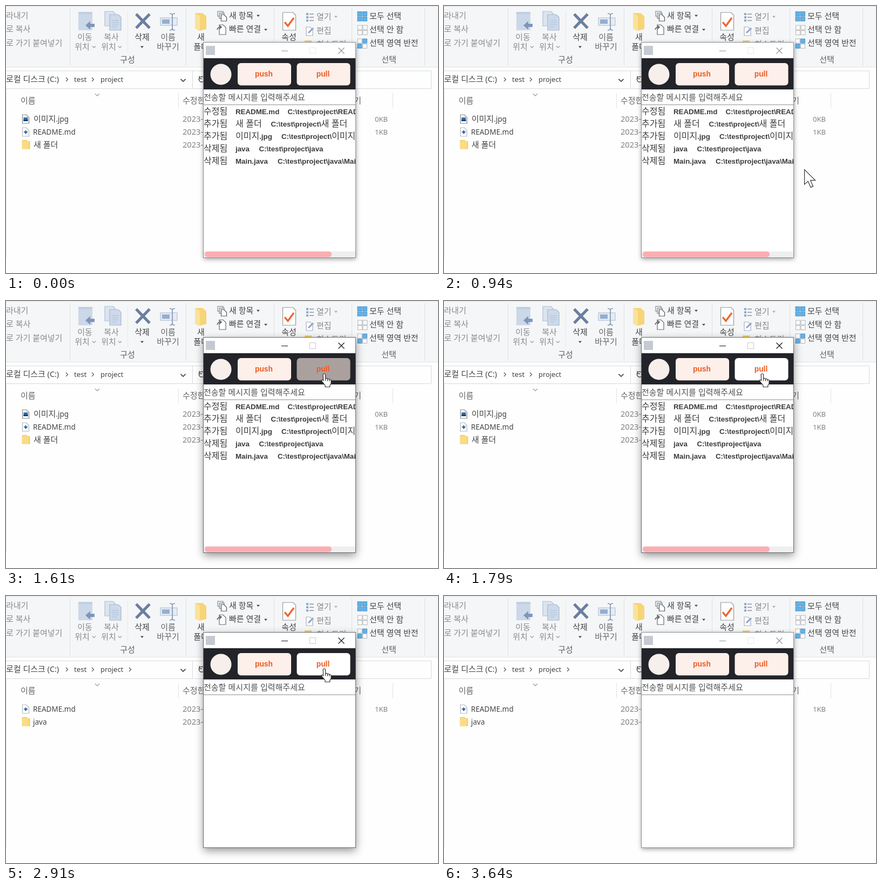
An HTML page that plays this animation: 800 by 496 pixels, repeating every 3670 ms.

```html
<!DOCTYPE html>
<html lang="ko">
<head>
<meta charset="utf-8">
<style>
html, body { margin: 0; width: 100%; height: 100%; overflow: hidden; background: #fefefe; }
svg { display: block; width: 800px; height: 496px; }
text { font-family: "Noto Sans", "Noto Sans CJK KR", sans-serif; white-space: pre; }
.swing text { font-family: "Liberation Sans", "Noto Sans CJK KR", sans-serif; }
</style>
</head>
<body>
<svg id="stage" viewBox="0 0 800 496" xmlns="http://www.w3.org/2000/svg"></svg>
<script>
const LOOP = 3670;
const INK = '#434448', DIM = '#8a8b8f';

const rect = (x, y, w, h, fill, more = '') =>
  `<rect x="${x}" y="${y}" width="${w}" height="${h}" fill="${fill}" ${more}/>`;
const path = (d, stroke, w = 1, fill = 'none', more = '') =>
  `<path d="${d}" stroke="${stroke}" stroke-width="${w}" fill="${fill}" ${more}/>`;
const vline = (x, y1, y2, c) => rect(x, y1, 1, y2 - y1, c);

// Hangul and Latin runs get their own font size; y is the middle of the line.
function label(x, y, str, { fill = INK, ko = 15, en = 13.5, anchor = 'start', weight = 400, koWeight = weight } = {}) {
  const runs = str.split(/([가-힣]+(?: [가-힣]+)*)/).filter(Boolean).map(s => {
    const han = /[가-힣]/.test(s);
    return `<tspan font-size="${han ? ko : en}" font-weight="${han ? koWeight : weight}">${s}</tspan>`;
  }).join('');
  return `<text x="${x}" y="${y + 5}" fill="${fill}" text-anchor="${anchor}">${runs}</text>`;
}
const mid = (x, y, s, fill) => label(x, y, s, { fill, anchor: 'middle' });
const tri = (x, y, c) => `<path d="M${x - 3} ${y - 1.5}h6l-3 3.5z" fill="${c}"/>`;
const down = (x, y, s, c, w = 1.2) => path(`M${x - s} ${y - s / 2}l${s} ${s}l${s} ${-s}`, c, w);
const next = x => path(`M${x - 2} 133l3.5 3.5l-3.5 3.5`, '#555', 1.2);
const page = (x, y, w, h, stroke, fill = '#fff') =>
  path(`M${x} ${y}h${w - 5}l5 5v${h - 5}h${-w}z`, stroke, 1.2, fill);

function tiles(x, y, fills) {
  return fills.map((f, i) => rect(x + (i % 2) * 9.5, y + (i >> 1) * 9.5, 8, 8, f ? '#62b1e6' : '#fafafa',
    `stroke="${f ? '#3a8cc9' : '#a5a7ab'}" stroke-width=".8"`)).join('');
}

const arrowLeft = (x, y, c) => `<path d="M${x} ${y}l9-8v5h8v6h-8v5z" fill="${c}"/>`;

function ribbon() {
  const seps = [118, 333, 496, 640, 775].map(x => vline(x, 4, 111, '#dfe0e2')).join('');
  return rect(0, 0, 800, 113, '#f5f6f7') + rect(0, 0, 800, 1, '#e3e4e6') + rect(0, 113, 800, 1, '#e2e3e5')
    + seps + vline(225, 9, 86, '#e6e7e9')
    + label(0, 17.5, '라내기', { fill: DIM }) + label(0, 43, '로 복사', { fill: DIM }) + label(0, 69, '로 가기 붙여넣기', { fill: DIM })
    // move, copy
    + rect(134, 11, 26, 34, '#cbd8e8') + rect(134, 11, 26, 4, '#bfcfe2') + arrowLeft(147, 36, '#7e96bb')
    + page(183, 10, 20, 27, '#aebfd6', '#dbe4ef') + page(192, 16, 21, 29, '#a5b8d2', '#cedaea')
    + path('M196 27h13M196 31h13M196 35h13M196 39h9', '#adbfd7')
    + mid(146, 58, '이동', DIM) + mid(141, 76, '위치', DIM) + down(163, 76, 3, '#999')
    + mid(195, 58, '복사', DIM) + mid(190, 76, '위치', DIM) + down(211, 76, 3, '#999')
    // delete, rename
    + path('M241 15L266 41M266 15L241 41', '#6b7ea2', 5.3)
    + mid(252, 58, '삭제') + tri(252, 76, INK)
    + rect(286, 22, 31, 14, '#e4ecf5', 'stroke="#a9b9d0"') + rect(289, 25, 14, 8, '#97adcd')
    + path('M303 14q5 0 5 3v24q0 4-5 4M313 14q-5 0-5 3v24q0 4 5 4', '#8497b4', 1.7)
    + mid(300, 58, '이름', '#66676b') + mid(300, 76, '바꾸기', '#66676b')
    // new
    + `<path d="M350 13h14l7 6v24l-13 3l-8-4z" fill="#f7d477"/><path d="M350 13l9 6v27l-9-4z" fill="#fbe29a"/>`
    + mid(361, 58, '새') + mid(361, 76, '폴더')
    + rect(392, 10, 10, 9, '#fff', 'stroke="#6e7176"') + rect(395, 13, 9, 10, '#dce9f5', 'stroke="#6e7176"')
    + page(398.5, 16, 10, 12, '#55585c')
    + label(413, 18, '새 항목') + tri(467, 18, INK)
    + page(395, 35, 12, 18, '#66696d') + path('M391 44q1-5 7-5m-3-3l4 3l-4 4', '#55585c', 1.5)
    + label(413, 43, '빠른 연결') + tri(481, 44, INK)
    // properties, open
    + page(512.5, 12, 24, 33, '#96989c') + path('M516 30l6 7l11-15', '#ee6430', 3.4)
    + mid(524, 58, '속성')
    + rect(556, 13, 4, 4, '#8ca9cb') + rect(556, 19, 4, 4, '#8ca9cb') + rect(556, 25, 4, 4, '#8ca9cb')
    + path('M562 15h8M562 21h8M562 27h8', '#a4acb8', 2)
    + label(575, 20, '열기', { fill: DIM }) + tri(611, 20, '#aaa')
    + page(556, 39, 12, 16, '#a7b0bd') + path('M560 50l9-9', '#8ca3c4', 3)
    + label(575, 46, '편집', { fill: DIM })
    + rect(553, 64, 13, 10, '#f6cf63') + label(575, 71, '히스토리', { fill: DIM })
    // selection
    + tiles(651, 10.5, [1, 1, 1, 1]) + tiles(651.5, 36, [0, 0, 0, 0]) + tiles(651, 61, [0, 1, 1, 0])
    + label(673, 18.5, '모두 선택') + label(673, 43.5, '선택 안 함') + label(673, 69, '선택 영역 반전')
    + mid(225, 100, '구성', '#5f6064') + mid(709, 100, '선택', '#5f6064');
}

function explorer() {
  return path('M0 120.5H787.5V153.5H0M345.5 120V153', '#d8d9db')
    + label(0, 136, '로컬 디스크 (C:)', { en: 14.3 }) + next(113) + label(126, 136, 'test', { en: 13.2 })
    + next(161) + label(175, 136, 'project', { en: 12.9 })
    + down(328, 138, 4.5, '#555', 1.8)
    + path('M365 132a5 5 0 1 0 2 6M358 130v5h5', '#555', 1.4)
    + vline(0, 154, 467, '#e8e8ea')
    + down(169, 165, 4, '#999')
    + label(27, 176, '이름', { fill: '#66676b' }) + label(327, 176, '수정한 날짜', { fill: '#66676b' })
    + label(658, 176, '크기', { fill: '#66676b', anchor: 'end' })
    + vline(319, 162, 190, '#e2e2e4') + vline(716, 162, 190, '#e2e2e4');
}

const icons = {
  image: y => page(30.5, y - 8, 12, 16, '#85888c') + rect(32.5, y - 3, 8, 7, '#2c6fae') + rect(32.5, y + 1, 8, 3, '#17406a'),
  doc: y => page(30.5, y - 8, 12, 16, '#b4b7bc') + path(`M36.5 ${y - 3}v4M34.5 ${y}l2 2.5l2-2.5z`, '#2d66a5', 2),
  folder: y => `<path d="M29.500 ${y - 9}h9l2 2h4v15h-15z" fill="#f5cf6c"/>` + rect(30, y - 7, 12, 15, '#fbdc85')
};
const file = (y, icon, name, size = '') => icons[icon](y)
  + label(/[가-힣]/.test(name) ? 51 : 50, y, name)
  + label(327, y, '2023-04', { fill: '#808185', en: 14.6 })
  + label(707, y, size, { fill: '#808185', en: 13, anchor: 'end' });

const button = (id, x, name) => rect(x, 106, 99, 41.5, '#fdefea', `rx="6" id="${id}"`)
  + label(x + 48.5, 126, name, { fill: '#ee5a22', en: 13.8, weight: 700, anchor: 'middle' });

const entry = (y, state, name, x, file) => {
  const style = { fill: '#3a3b3e', ko: 16, en: 13.3, weight: 700, koWeight: 500 };
  return label(366, y, state, style) + label(425, y, name, style) + label(x, y, 'C:\\test\\project\\' + file, style);
};

function app() {
  return `<g class="swing" clip-path="url(#win)">`
    + rect(366, 68, 282, 400, '#fff') + rect(370, 74, 17, 17, '#c5cad2')
    + `<g id="controls" fill="none" stroke-width="1.2"><path d="M510 83.500h12M615.500 77.500l11 11M626.500 77.500l-11 11"/></g>`
    + rect(562.5, 77.5, 11, 11, 'none', 'id="maxBox"')
    + rect(366, 97, 282, 58, '#222429')
    + `<circle cx="398" cy="127" r="19.500" fill="#f6efec"/>`
    + button('push', 429, 'push') + button('pull', 538.5, 'pull')
    + rect(366, 183, 282, 1, '#8d8f93')
    + label(366, 169.5, '전송할 메시지를 입력해주세요', { fill: '#505154', koWeight: 300 })
    + `<g id="changes">`
    + entry(196, '수정됨', 'README.md', 521.5, 'README.md')
    + entry(219, '추가됨', '새 폴더', 490.5, '새 폴더')
    + entry(242, '추가됨', '이미지.jpg', 510, '이미지.jpg')
    + entry(265, '삭제됨', 'java', 468.5, 'java')
    + entry(288, '삭제됨', 'Main.java', 503, 'java\\Main.java')
    + rect(366, 456, 282, 11, '#efeff0') + rect(368, 456, 235, 10.5, '#fbaeb1', 'rx="5"')
    + '</g></g>' + rect(365.5, 67.5, 282, 400, 'none', 'id="frame"');
}

const $ = id => document.getElementById(id);
$('stage').innerHTML = `<clipPath id="win"><rect x="366" y="68" width="282" height="400"/></clipPath>`
  + rect(0, 0, 800, 496, '#fefefe') + ribbon() + explorer()
  + `<g id="before">${file(210, 'image', '이미지.jpg', '0KB')}${file(234, 'doc', 'README.md', '1KB')}${file(258, 'folder', '새 폴더')}</g>`
  + `<g id="after">${next(230)}${file(210, 'doc', 'README.md', '1KB')}${file(234, 'folder', 'java')}</g>`
  + rect(366, 68, 282, 400, '#fff', 'id="shadow"') + app()
  + path('M.5.5V28l6.500-6l5 11.500l4.500-2l-5-11h9z', '#333', 1.2, '#fff', 'id="arrow"')
  + '<g id="hand">'
  + path('M1.500 2.500q0-2 2-2t2 2v7q2-1.500 3.500.5q2-1 3 1q3-.5 3 2.500v5l-2 3v3h-8v-3l-5-6.500q-2-3 0-3.500l2 1.500z'
    + 'M5.500 9.500v4M9 10v4M12 11v3', '#333', 1.1, '#fff', 'transform="scale(1.1 1.03)"')
  + '</g>';

const moves = [
  [610, 744, 397], [670, 744, 397], [750, 733, 383], [880, 690, 331],
  [1090, 611, 236], [1180, 585.5, 134.5], [2940, 585.5, 134.5], [2980, 674, 12], [3000, 712, -40]
];

function pointer(t) {
  const i = moves.findIndex(m => m[0] > t);
  if (i < 1) return null;
  const [t0, x0, y0] = moves[i - 1], [t1, x1, y1] = moves[i];
  const k = (t - t0) / (t1 - t0);
  return [x0 + (x1 - x0) * k, y0 + (y1 - y0) * k];
}

const show = (id, on) => $(id).setAttribute('visibility', on ? 'visible' : 'hidden');
const within = (t, a, b) => t >= a && t < b;

function draw(t) {
  const active = within(t, 1420, 3520), hover = within(t, 1180, 2940);
  show('before', t < 2390);
  show('after', t >= 2390);
  show('changes', t < 2060);
  $('pull').setAttribute('fill', within(t, 1420, 1670) ? '#aaa19f' : hover ? '#fff' : '#fdefea');
  $('controls').setAttribute('stroke', active ? '#111' : '#929395');
  $('maxBox').setAttribute('stroke', active ? '#c9c9cb' : '#e9e9eb');
  $('frame').setAttribute('stroke', active ? '#66686b' : '#8c8e91');
  $('shadow').style.filter = active
    ? 'drop-shadow(0 5px 8px rgba(0,0,0,.42))' : 'drop-shadow(0 2px 4px rgba(0,0,0,.4))';
  const p = pointer(t);
  show('hand', p && hover);
  show('arrow', p && !hover);
  if (p) $(hover ? 'hand' : 'arrow').setAttribute('transform', `translate(${p[0]} ${p[1]})`);
}

const start = performance.now();
function tick() {
  draw((performance.now() - start) % LOOP);
  requestAnimationFrame(tick);
}
tick();
</script>
</body>
</html>
```
